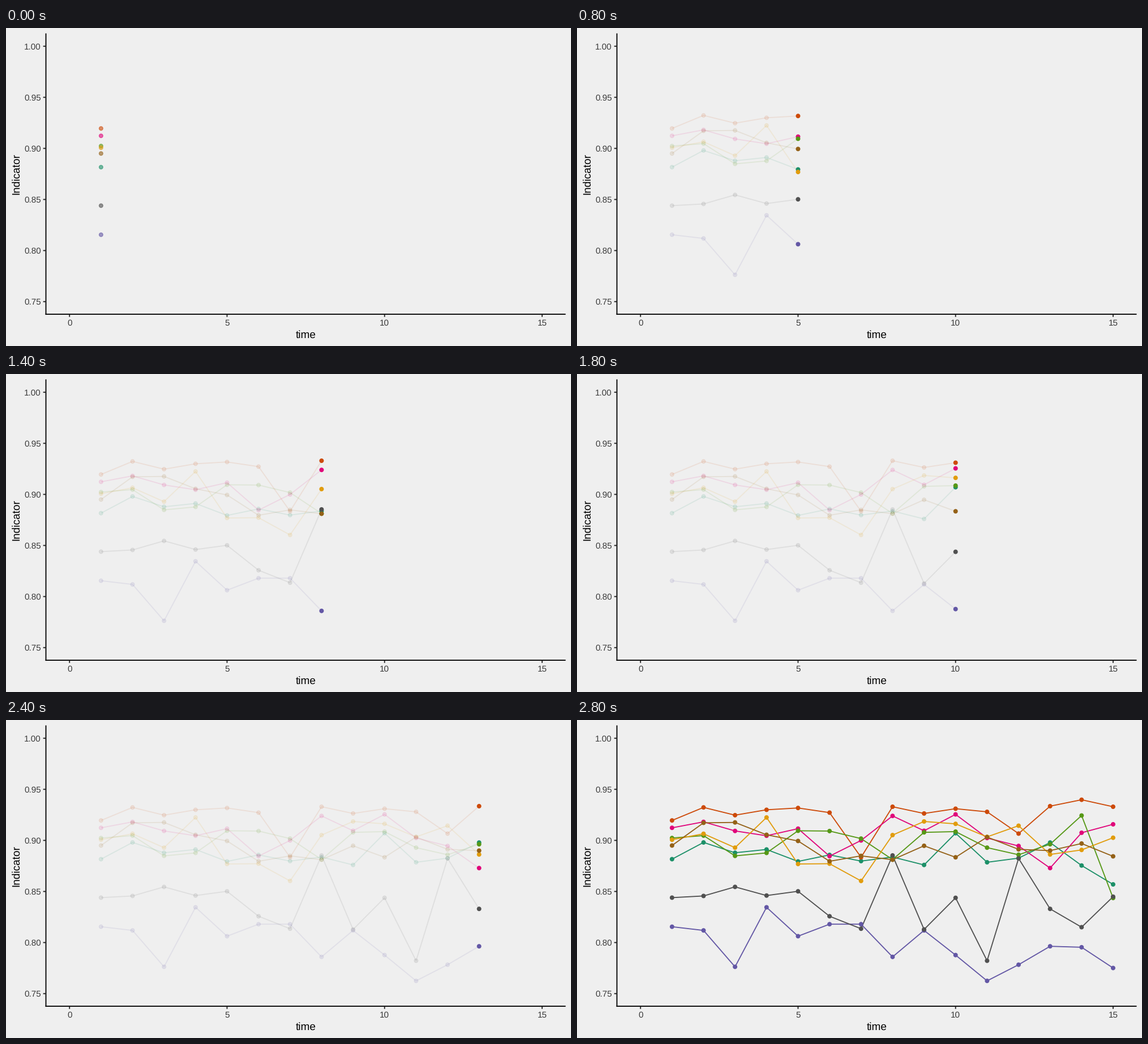
A matplotlib script that plays this animation: 998 px wide and 561 px high, repeating every 5200 ms.

```python
import numpy as np
import matplotlib.pyplot as plt
from matplotlib.animation import FuncAnimation

W, H, DPI = 998, 561, 64
STEPS, FRAMES, INTERVAL = 15, 26, 200
PX = 72 / DPI  # points per pixel

plt.rcParams["font.family"] = "Liberation Sans"
plt.rcParams["text.hinting"] = "none"

# colour and vertical pixel position at time 1..15, back to front
SERIES = [
    ("#1c9068", [245.3, 215.8, 234, 228.2, 249.3, 237.8, 248.7, 241.5,
                 255.5, 199.5, 250.8, 243.5, 216, 256.5, 289.8]),
    ("#cd4a09", [177, 154, 167.7, 158.2, 155, 163.2, 242, 152.8,
                 164.7, 156.3, 161.8, 200.2, 151.8, 140.5, 152.8]),
    ("#6357a5", [364.5, 371, 435.2, 330.2, 381.2, 360, 360, 417.7,
                 371, 414.5, 460, 431.5, 399, 400.7, 437.3]),
    ("#e0057a", [190, 179.5, 195.5, 204, 191.5, 240, 212.3, 169,
                 195.2, 166.3, 208, 222, 261, 198.7, 183.8]),
    ("#569816", [208, 203.7, 239.5, 234.3, 195.2, 195.7, 209, 246,
                 198, 196.7, 225, 237.5, 219, 168.3, 313.8]),
    ("#e19c0c", [211, 200.5, 225, 171.7, 253.8, 253.3, 283.7, 202.8,
                 178.8, 183, 206, 186.3, 237, 229, 207.5]),
    ("#946117", [221.2, 181.2, 180.5, 202.3, 213.2, 249, 239.5, 246.3,
                 221.7, 242, 206.3, 228, 230.2, 217.7, 240.3]),
    ("#505050", [313.2, 310.2, 294.2, 309.5, 302, 346, 368, 238.7,
                 369.3, 313.5, 424.5, 244, 333, 365.3, 311.5]),
]


def x_of(time):
    return 112.2 + 55.65 * time


def y_of(value):
    return 32.2 + 1802 * (1 - value)


fig = plt.figure(figsize=(W / DPI, H / DPI), dpi=DPI, facecolor="#efefef")
ax = fig.add_axes([0, 0, 1, 1])
ax.set_xlim(0, W)
ax.set_ylim(H, 0)
ax.axis("off")


def rule(xs, ys, color):
    ax.plot(xs, ys, color=color, lw=1.85 * PX, solid_capstyle="butt", snap=False)


def label(x, y, text, size, color, **kw):
    ax.text(x, y, text, fontsize=size * PX, color=color, va="baseline", **kw)


LEFT, BASE = 70.5, 504.9
rule([LEFT, LEFT], [9.5, BASE + 0.9], "black")
rule([LEFT - 0.9, 988.5], [BASE, BASE], "black")
for value in (0.75, 0.80, 0.85, 0.90, 0.95, 1.00):
    y = y_of(value)
    rule([LEFT - 4.8, LEFT], [y, y], "#222222")
    label(61.9, y + 5.4, f"{value:.2f}", 15.2, "#3a3a3a", ha="right")
for time in (0, 5, 10, 15):
    x = x_of(time)
    rule([x, x], [BASE, BASE + 4.8], "#222222")
    label(x, 524.6, str(time), 15.2, "#3a3a3a", ha="center")
label(529.4, 547.2, "time", 19, "black", ha="center")
label(22.8, 257.3, "Indicator", 19, "black", ha="center",
      rotation=90, rotation_mode="anchor")

times = x_of(np.arange(1, STEPS + 1))
colors = [c for c, _ in SERIES]
heights = np.array([h for _, h in SERIES]) + 0.2

lines = [ax.plot([], [], color=c, lw=1.85 * PX, solid_capstyle="butt",
                 solid_joinstyle="round", zorder=3)[0] for c in colors]

# dots run time by time so that the newest lie on top
dot_rgba = np.array([plt.matplotlib.colors.to_rgba(c) for c in colors] * STEPS)
dot_step = np.repeat(np.arange(STEPS), len(SERIES))
dots = ax.scatter(np.repeat(times, len(SERIES)), heights.T.ravel(),
                  s=(2 * 3.37 * PX) ** 2, linewidths=1.22 * PX, zorder=4)


def draw(frame):
    step = min(frame, STEPS - 1)
    done = step == STEPS - 1
    for line, ys in zip(lines, heights):
        line.set_data(times[:step + 1], ys[:step + 1])
        line.set_alpha(1 if done else 0.1)
    newest = 0.6 if step == 0 else 1
    past = 1 if done else 0.1
    rgba = dot_rgba.copy()
    rgba[:, 3] = np.select([dot_step < step, dot_step == step], [past, newest], 0)
    dots.set_facecolors(rgba)
    dots.set_edgecolors(rgba)
    return [*lines, dots]


anim = FuncAnimation(fig, draw, frames=FRAMES, interval=INTERVAL,
                     repeat=True, repeat_delay=0)
plt.show()
```
